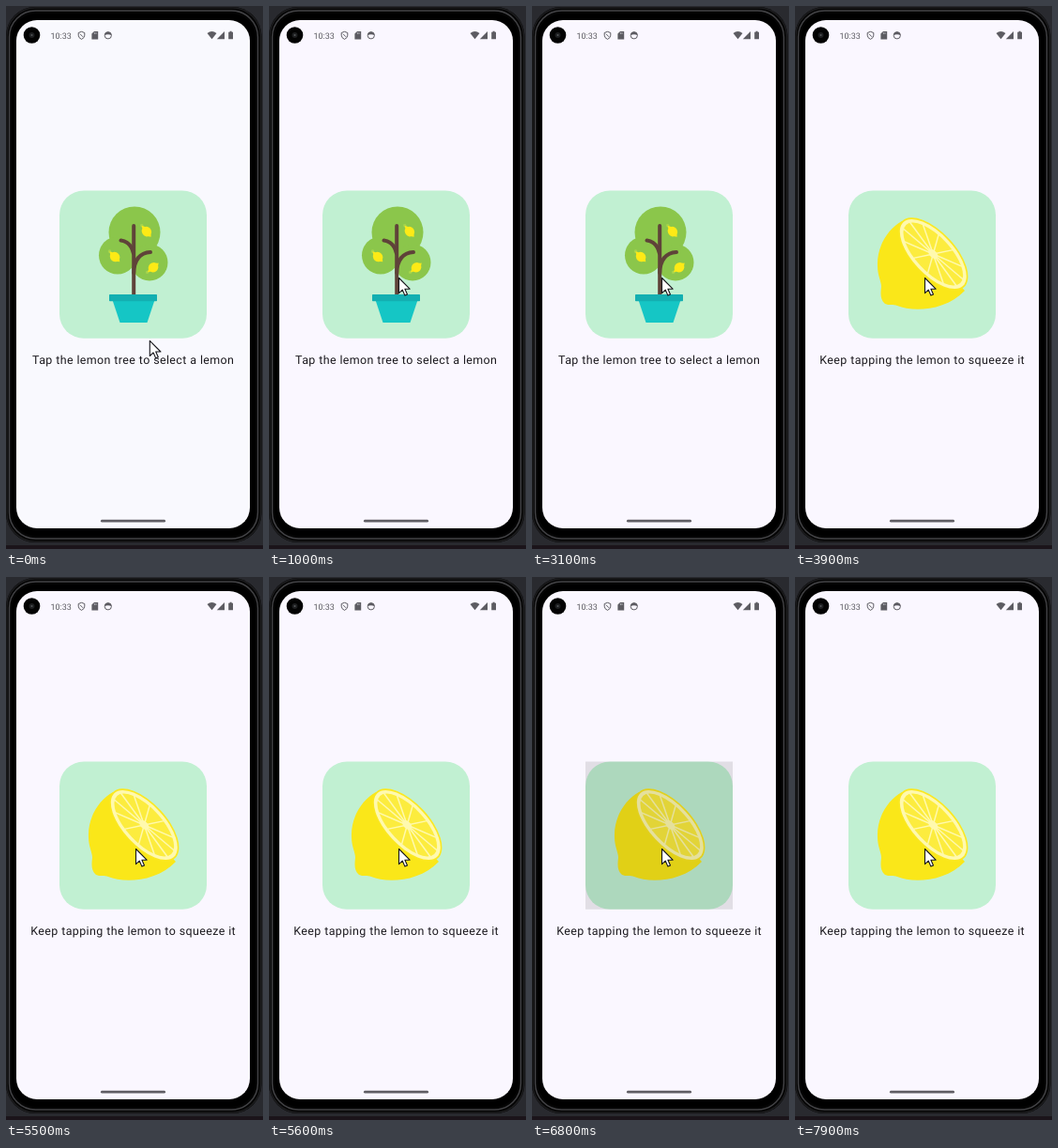
Write an HTML page that moves like this. It is 274 px wide and 578 px high and loops after 8000 ms.

```html
<!DOCTYPE html>
<html lang="en">
<head>
<meta charset="utf-8">
<title>Lemon tree</title>
<style>
  html, body { margin: 0; width: 100%; height: 100%; overflow: hidden; background: #292a2f; }
  svg { display: block; width: 274px; height: 578px; }
  text { font-family: Roboto, "Noto Sans", sans-serif; text-rendering: geometricPrecision; }
  .label { font-size: 12.45px; letter-spacing: .4px; fill: #1d1b20; text-anchor: middle; }
  .status { fill: #5d5c62; }
  .line { fill: none; stroke-linecap: round; }
</style>
</head>
<body>
<svg viewBox="0 0 274 578">
  <!-- phone -->
  <rect width="274" height="578" fill="#292a2f"/>
  <rect y="574" width="274" height="4" fill="#1b141a"/>
  <rect x="0" y="1" width="272.5" height="570" rx="31" fill="#050505"/>
  <rect x="1" y="2" width="270.5" height="568" rx="30" fill="none" stroke="#1c1c1e" stroke-width="1.5"/>
  <rect x="3.5" y="5" width="265" height="562" rx="28" fill="none" stroke="#434346" stroke-width="1.4"/>
  <rect x="6" y="8" width="260" height="556" rx="26" fill="#000"/>
  <rect id="screen" x="11" y="15" width="249" height="541" rx="22"/>

  <!-- status bar -->
  <circle cx="27.5" cy="31" r="8.8" fill="#030303"/>
  <circle cx="27.5" cy="31" r="3" fill="#1d1e20"/>
  <circle cx="27.5" cy="31" r="1" fill="#55575a"/>
  <g class="status">
    <text x="47.5" y="34.6" font-size="9">10:33</text>
    <path d="M80.5 27.3l3.3 1.2v2.7q0 2.8-3.3 4.2q-3.3-1.4-3.3-4.2v-2.7z" fill="none" stroke="#5d5c62"/>
    <path d="M79 29.8l3 3" stroke="#5d5c62"/>
    <path d="M94 27h4.2v8.4h-6.8v-5.8z"/>
    <path d="M94.4 28.2v1.6M96 28.2v1.6" stroke="#f9f8fe" stroke-width=".6"/>
    <circle cx="108.8" cy="31.3" r="3.6" fill="none" stroke="#5d5c62"/>
    <path d="M105.2 31a3.6 3.6 0 0 1 7.2 0q-3.6-1.6-7.2 0z"/>
    <path d="M214.5 29q5-3.8 10 0l-5 6.3z"/>
    <path d="M233 27v8.2h-8.2z"/>
    <path d="M238.6 26.8h2v.9h1.4v7.5h-4.8v-7.5h1.4z"/>
  </g>

  <rect x="57" y="196.5" width="157" height="157.3" rx="26" fill="#c1f0d2"/>

  <g id="tree">
    <g fill="#8bc64b">
      <circle cx="137" cy="241" r="27.5"/>
      <circle cx="119" cy="265.5" r="20"/>
      <circle cx="153" cy="273" r="19.5"/>
    </g>
    <g id="fruits"></g>
    <g class="line" stroke="#5f4339" stroke-width="4">
      <path d="M136.2 234V308"/>
      <path d="M122.5 249.5Q133 251 135.8 263"/>
      <path d="M136.2 284Q137 263 154 262"/>
    </g>
    <path d="M113.5 313h45l-8 24h-29z" fill="#15c6c5"/>
    <rect x="110" y="307" width="51" height="7.3" rx=".8" fill="#13afb1"/>
    <text class="label" x="135.7" y="381.2">Tap the lemon tree to select a lemon</text>
  </g>

  <g id="lemon">
    <path d="M114 229C98 238 87 257 88 277C88 287 92 293 92 299C91 307 91 313 96 317C100 319 105 317 109 319C125 326 160 325 181 303Z" fill="#fae719"/>
    <g transform="translate(147.3 264) rotate(47)">
      <ellipse rx="48.2" ry="23.5" fill="#fbe820"/>
      <ellipse rx="46.5" ry="21.8" fill="#fff9ae"/>
      <ellipse rx="42.3" ry="18.4" fill="#fcec3e"/>
      <g id="spokes" stroke="#fff9ae" stroke-width="1.5"></g>
      <ellipse rx="6.2" ry="3.8" fill="#fff9ae"/>
    </g>
    <text class="label" x="135.7" y="381.2">Keep tapping the lemon to squeeze it</text>
  </g>

  <rect id="press" x="57" y="196.5" width="157" height="157.3"/>
  <rect x="101" y="546.8" width="69" height="2.8" rx="1.4" fill="#605e64"/>
  <path id="cursor" d="M0 0V16.2L3.8 12.7L6.4 18.6L9 17.4L6.4 11.7H11.6Z" fill="#fff" stroke="#15151a" stroke-width="1.1" stroke-linejoin="round"/>
</svg>
<script>
  const LOOP = 8000, STEP = 100, PICKED = 3300;
  const el = id => document.getElementById(id);

  // Rows are [time, value, ...]
  const pointer = [[0, 153.3, 356.3], [100, 153, 355], [300, 148, 330], [500, 141, 302], [700, 138.5, 289.5]];
  const shade = [[3100, 0], [3200, .1], [3400, .1], [3700, 0], [6700, 0], [6800, .1], [6900, .1], [7300, 0]];

  function sample(rows, t) {
    const next = rows.findIndex(row => row[0] > t);
    if (next < 0) return rows[rows.length - 1].slice(1);
    if (next === 0) return rows[0].slice(1);
    const a = rows[next - 1], b = rows[next];
    const k = (t - a[0]) / (b[0] - a[0]);
    return a.slice(1).map((v, i) => v + (b[i + 1] - v) * k);
  }

  const fruit = (x, y, turn) => `<g transform="translate(${x} ${y}) rotate(${turn})">
    <path d="M-5 0Q-9-4-10 0Q-8 3-5 0" fill="#a5d44d"/>
    <path d="M-8 0Q-5-1-4-3.4Q0-6.6 4-3.6Q5.5-1 7.5 0Q5.5 1 4 3.6Q0 6.6-4 3.4Q-5 1-8 0" fill="#fdea16"/></g>`;
  el("fruits").innerHTML = fruit(149.8, 240, 50) + fruit(116, 267, 45) + fruit(157, 278.3, -40);

  el("spokes").innerHTML = Array.from({ length: 12 }, (_, i) => {
    const a = (i + .5) * Math.PI / 6;
    return `<path d="M0 0L${43 * Math.cos(a)} ${19 * Math.sin(a)}"/>`;
  }).join("");

  function draw(now) {
    const t = Math.floor(now % LOOP / STEP) * STEP;
    const picked = t >= PICKED;
    el("tree").style.display = picked ? "none" : "";
    el("lemon").style.display = picked ? "" : "none";
    el("screen").setAttribute("fill", t < 500 ? "#f9f9fe" : "#faf7ff");
    el("press").setAttribute("fill-opacity", sample(shade, t)[0]);
    el("cursor").setAttribute("transform", `translate(${sample(pointer, t)})`);
  }

  const start = performance.now();
  function tick() {
    draw(performance.now() - start);
    requestAnimationFrame(tick);
  }
  tick();
</script>
</body>
</html>
```
